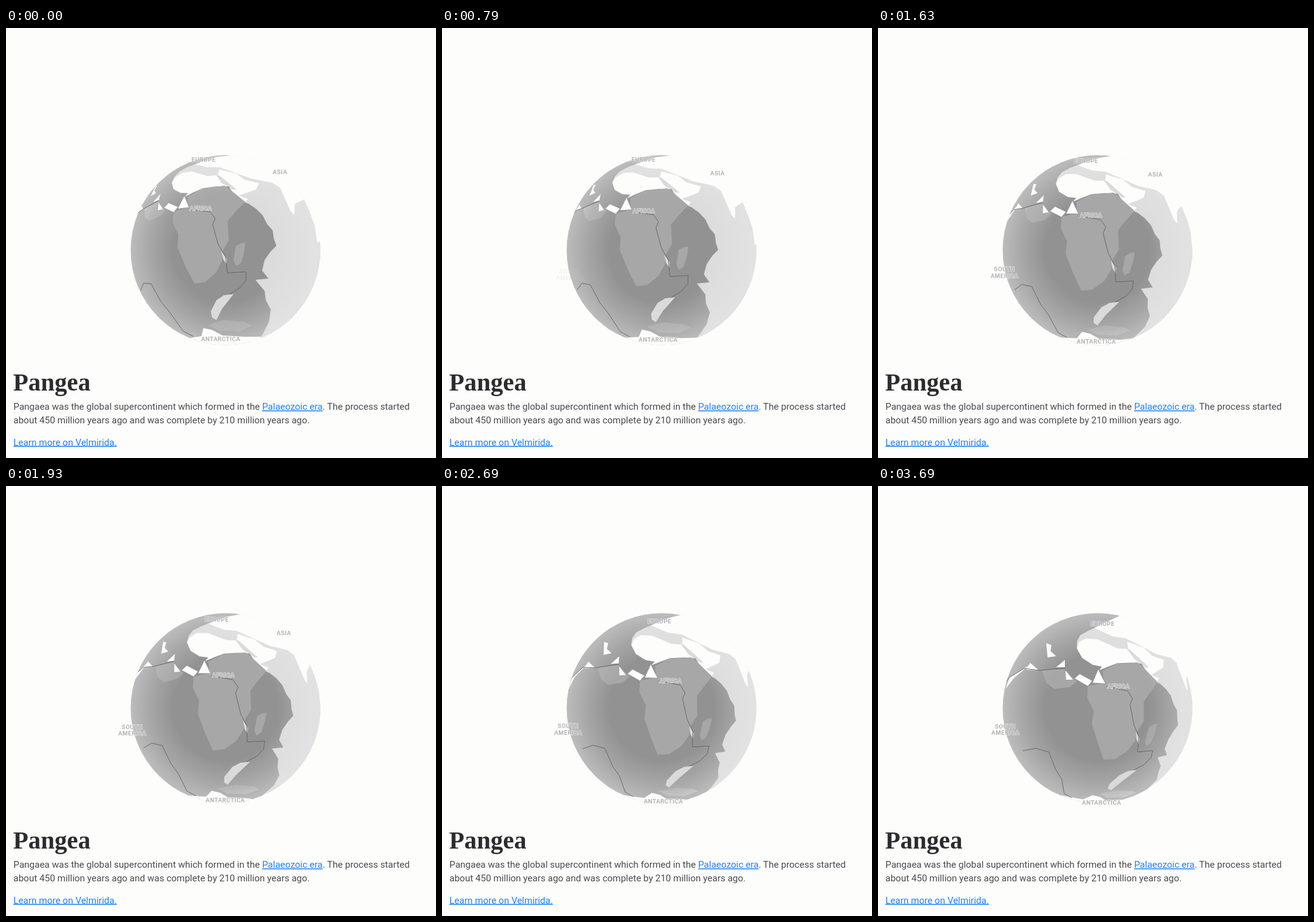
Write an HTML page that moves like this. It is 695 px wide and 695 px high and loops after 3.72 s.

```html
<!DOCTYPE html>
<html lang="en">
<head>
<meta charset="utf-8">
<title>Pangea</title>
<style>
  html, body { margin: 0; width: 100%; height: 100%; overflow: hidden; background: #fdfdfc; }
  svg { display: block; width: 695px; height: 695px; }
  .body { font: 15px Roboto, sans-serif; fill: #4a4a4e; }
  .link { fill: #2080f8; text-decoration: underline; }
  .title { font: bold 40.2px "Liberation Serif", serif; fill: #2c2c2e; }
  .label { font: 500 9.5px Roboto, sans-serif; letter-spacing: .6px; text-anchor: middle;
    fill: #acacac; stroke: #f6f6f6; stroke-width: 1.4; stroke-opacity: .75; paint-order: stroke; }
</style>
</head>
<body>
<svg viewBox="0 0 695 695">
  <defs>
    <clipPath id="disc"><circle cx="355" cy="359" r="153.5"/></clipPath>
    <radialGradient id="sea" gradientUnits="userSpaceOnUse" cx="355" cy="359" r="153.5">
      <stop offset=".3" stop-color="#d9d9d9"/><stop offset="1" stop-color="#e2e2e2"/>
    </radialGradient>
    <radialGradient id="old" gradientUnits="userSpaceOnUse" cx="355" cy="359" r="153.5">
      <stop offset=".55" stop-color="#929292"/><stop offset=".79" stop-color="#a6a6a6"/>
      <stop offset="1" stop-color="#bcbcbc"/>
    </radialGradient>
    <radialGradient id="now" gradientUnits="userSpaceOnUse" cx="355" cy="359" r="153.5">
      <stop offset=".6" stop-color="#a7a7a7"/><stop offset=".84" stop-color="#b5b5b5"/>
      <stop offset="1" stop-color="#cecece"/>
    </radialGradient>
  </defs>
  <g id="globe" clip-path="url(#disc)"><circle cx="355" cy="359" r="153.5" fill="url(#sea)"/></g>
  <g id="labels"></g>
  <text class="title" x="11.5" y="586">Pangea</text>
  <text class="body" x="12" y="617">Pangaea was the global supercontinent which formed in the <tspan class="link">Palaeozoic era</tspan>. The process started</text>
  <text class="body" x="12" y="639">about 450 million years ago and was complete by 210 million years ago.</text>
  <text class="body link" x="12" y="674.5">Learn more on Velmirida.</text>
</svg>
<script>
const LOOP = 3720, END = 3690, CX = 355, CY = 359, R = 153.5;
const DIST = 8, K = Math.sqrt(DIST * DIST - 1), RAD = Math.PI / 180;

// Cubic ease with its own speed at either end
function ease(u, v0, v1) {
  const r = 1 - u;
  return v0 * u * r * r + u * u * (3 - 2 * u) - v1 * u * u * r;
}

// The view swings west and tilts north together
function camera(t) {
  const s = ease(Math.min(t / END, 1), .52, .75);
  const a = (39.3 - 24.7 * s) * RAD, b = (-17.2 + 11.8 * s) * RAD;
  return { sa: Math.sin(a), ca: Math.cos(a), sb: Math.sin(b), cb: Math.cos(b) };
}

// Screen point to a point on the turned sphere; outside the disc means behind the limb
function unproject(x, y, c) {
  let u = (x - CX) / R, v = (CY - y) / R, z, f;
  const r = Math.hypot(u, v);
  if (r >= 1) {
    z = 2 - 2 * r;
    f = Math.sqrt(1 - z * z) / r;
  } else {
    const a = r * r / (K * K);
    z = (a * DIST + Math.sqrt(1 + a - a * DIST * DIST)) / (1 + a);
    f = (DIST - z) / K;
  }
  u *= f; v *= f;
  const w = z * c.cb - v * c.sb;
  return [u * c.ca + w * c.sa, v * c.cb + z * c.sb, w * c.ca - u * c.sa];
}

function turn([px, py, pz], c) {
  const w = px * c.sa + pz * c.ca;
  return [px * c.ca - pz * c.sa, py * c.cb - w * c.sb, py * c.sb + w * c.cb];
}

function project(p, c) {
  const [u, v, z] = turn(p, c);
  const m = z < 1 / DIST ? 1.04 * R / Math.hypot(u, v) : R * K / (DIST - z);
  return (CX + u * m).toFixed(2) + "," + (CY - v * m).toFixed(2);
}

// Points as seen at time t
const pin = (t, text) => text.trim().split(/\s+/)
  .map(p => unproject(...p.split(",").map(Number), camera(t)));

// An arc just behind the limb at time t, from angle a to b
function rim(t, a, b) {
  const c = camera(t), n = Math.ceil(Math.abs(b - a) / 18), out = [];
  for (let i = 0; i <= n; i++) {
    const q = (a + (b - a) * i / n) * RAD;
    out.push(unproject(CX + 1.15 * R * Math.cos(q), CY + 1.15 * R * Math.sin(q), c));
  }
  return out;
}

function add(parent, tag, attrs) {
  const el = document.createElementNS("http://www.w3.org/2000/svg", tag);
  for (const k in attrs) el.setAttribute(k, attrs[k]);
  return parent.appendChild(el);
}

const globe = document.getElementById("globe"), shapes = [];
const area = (fill, points) => shapes.push({ points, el: add(globe, "polygon", { fill }) });
const line = points => shapes.push({ points, el: add(globe, "polyline",
  { fill: "none", stroke: "#626266", "stroke-width": .9, "stroke-linejoin": "round" }) });

const LAND = "#fdfdfc", SEA = "#dadada", OLD = "url(#old)", NOW = "url(#now)";

// Europe and Asia
area(LAND, [...rim(0, -98, -5), ...pin(0, `503,346 499,320 492,300 482,277 467,284 466,302
  460,296 443,258 430,250 395,243 368,233 345,225 325,225 302,219 318,208`)]);
// North Africa and Arabia, parted by the Red Sea
area(LAND, pin(0, `268,250 274,241 285,234 300,232 325,239 342,238 345,229 372,235 385,245
  409,251 404,261 376,271 391,276 383,285 300,276 272,264`));
area(SEA, pin(1930, "371,249 376,250 407,277 401,277 382,264"));

// The supercontinent
area(OLD, [
  ...rim(END, 90, 285),
  ...pin(END, "398,211 375,217 340,234 327,241 322,250 321,262 330,278 347,289 362,292 357,298"),
  ...pin(0, `302,266 318,259 340,256 360,256 366,265 376,278 392,284 404,292 415,303 422,317
    431,327 433,341 437,352 427,362 418,375 414,392 424,405 403,407 418,425 420,440 428,455
    425,475 414,497`)
]);

// Present coasts inside it: Africa, Madagascar, West Africa, Antarctica
area(NOW, pin(1930, `329,302 327,284 350,272 387,269 396,276 421,299 408,314 395,330 396,362
  386,378 383,395 372,412 352,426 334,427 322,400 310,368 312,347 302,326 303,308`));
area(NOW, pin(0, "371,353 379,348 387,347 385,362 380,380 372,385 368,376"));
area(NOW, pin(END, "265,298 300,296 321,316 310,325 285,328 272,318"));
area(NOW, pin(0, "326,480 352,472 385,475 398,481 378,490 345,489"));

// Gaps between the plates
const gaps = ["356,297 367,319 347,318", "318,311 326,304 346,315 339,323", "303,298 315,313 304,313",
  "302,281 302,293 288,293", "246,286 260,298 239,297", "272,254 280,257 279,267 288,275 274,277",
  "206,328 213,309 247,288 220,310"];
for (const g of gaps) area(LAND, pin(END, g));
area(SEA, pin(0, "331,458 340,440 352,432 368,430 349,454 340,472 333,468"));
area(SEA, pin(0, "348,361 357,373 357,382 351,374"));
area(LAND, [...rim(0, 70, 112), ...pin(0, "288,499 316,498 319,485 333,488 350,497 385,499 412,499")]);

// Faults
line(pin(0, `297,294 330,297 338,308 334,318 343,350 355,370 358,396 388,394 388,407 378,420 362,430`));
line(pin(END, "234,428 255,424 276,430 287,458 297,474 301,497 313,504"));
line(pin(END, "204,327 213,309 236,295 262,298 302,294"));

const labels = [
  { text: "EUROPE", lat: 50.4, lon: 19 },
  { text: "ASIA", lat: 51, lon: 104 },
  { text: "AFRICA", lat: 6.4, lon: 25.8 },
  { text: "SOUTH AMERICA", lat: -14, lon: -60 },
  { text: "ANTARCTICA", lat: -78, lon: 26 }
];
for (const l of labels) {
  const a = l.lat * RAD, b = l.lon * RAD, words = l.text.split(" ");
  l.point = [Math.cos(a) * Math.sin(b), Math.sin(a), Math.cos(a) * Math.cos(b)];
  l.el = add(document.getElementById("labels"), "g", { class: "label" });
  words.forEach((s, i) => {
    add(l.el, "text", { y: 3.4 + (i - (words.length - 1) / 2) * 10.5 }).textContent = s;
  });
}

function draw(t) {
  const c = camera(t);
  for (const s of shapes) s.el.setAttribute("points", s.points.map(p => project(p, c)).join(" "));
  for (const l of labels) {
    const [u, v, z] = turn(l.point, c), m = 1.01 * R * K / (DIST - z);
    l.el.setAttribute("transform", `translate(${(CX + u * m).toFixed(2)} ${(CY - v * m).toFixed(2)})`);
    // Fades out as it passes the horizon
    l.el.setAttribute("opacity", Math.max(0, Math.min(1, (z + .025) / .01)).toFixed(3));
  }
}

function frame() {
  draw(performance.now() % LOOP);
  requestAnimationFrame(frame);
}
frame();
</script>
</body>
</html>
```
